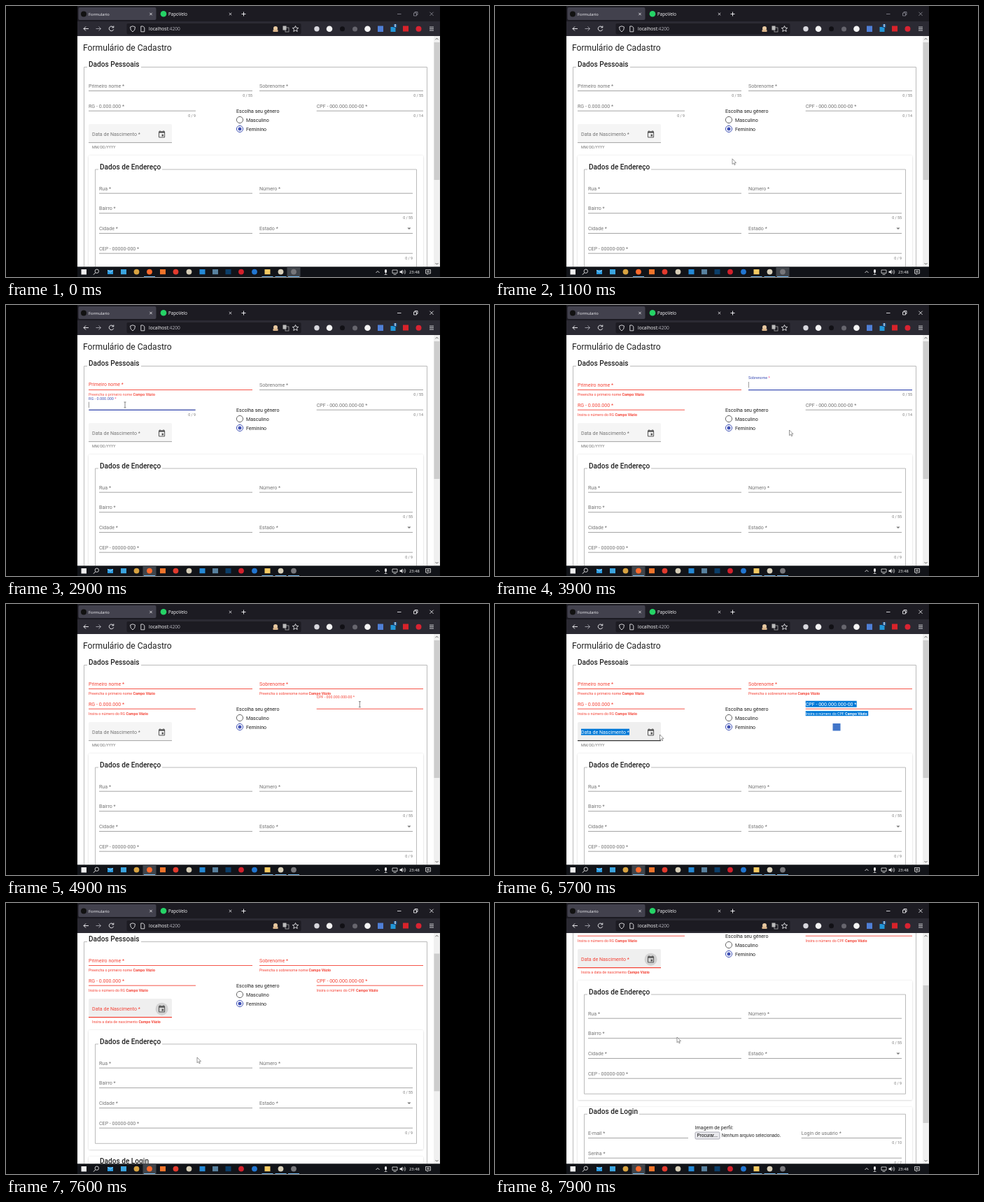
Recreate the animation shown at these times as an HTML page. Size 690 by 388 pixels, loop 8000 ms.

```html
<!DOCTYPE html>
<html lang="pt">
<head>
<meta charset="utf-8">
<title>Formulario</title>
<style>
html, body { margin: 0; height: 100%; overflow: hidden; background: #000; }
svg { display: block; width: 100%; height: 100%; font-family: Roboto, sans-serif; }
</style>
</head>
<body>
<svg id="stage" viewBox="0 0 690 388"></svg>
<script>
const LOOP = 8000, STEP = 100;
const BLUE = '#3f51b5', RED = '#f44336', GREY = '#757575', INK = '#212121', SELECT = '#0078d7';
const BODY = 7.08, SMALL = 5.31;
const UI = 'font-family="Open Sans, sans-serif"';

// Drawing helpers; text is placed by the middle of its capitals
const text = (x, cy, s, size, fill, more = '') =>
  `<text x="${x}" y="${cy + size * .355}" font-size="${size}" fill="${fill}" ${more}>${s}</text>`;
const rect = (x, y, w, h, fill, more = '') =>
  `<rect x="${x}" y="${y}" width="${w}" height="${h}" fill="${fill}" ${more}/>`;
const disc = (x, y, r, fill, more = '') => `<circle cx="${x}" cy="${y}" r="${r}" fill="${fill}" ${more}/>`;
const line = (d, stroke, w = 1, more = '') =>
  `<path d="${d}" fill="none" stroke="${stroke}" stroke-width="${w}" ${more}/>`;
const shape = (d, fill, more = '') => `<path d="${d}" fill="${fill}" ${more}/>`;

const clamp = u => Math.max(0, Math.min(1, u));
const easeOut = (u, power) => 1 - (1 - clamp(u)) ** power;

// Linear interpolation over rows of [time, ...values]
function along(keys, t) {
  let i = 0;
  while (i < keys.length - 2 && t >= keys[i + 1][0]) i++;
  const [a, b] = [keys[i], keys[i + 1]];
  const u = clamp((t - a[0]) / (b[0] - a[0]));
  return a.slice(1).map((v, k) => v + (b[k + 1] - v) * u);
}

const POINTER = [
  [400, 411, 366], [600, 397, 252], [900, 397, 252], [1700, 165, 119], [2200, 165, 119],
  [2650, 170, 143], [3000, 170, 143], [3450, 400, 115], [3700, 400, 115], [3900, 420.5, 179],
  [4250, 480, 143], [4700, 480, 143], [5000, 518, 144], [5200, 480, 168], [5400, 480, 168],
  [5700, 235.5, 187], [6100, 222, 183], [6500, 222, 183], [6800, 290, 201],
  [7300, 273, 221], [7600, 273, 221], [7900, 260, 192]
];
const SCROLL = [[7400, 0], [7600, 32], [7900, 103]];

const star = (label, fill) => `${label}<tspan fill="${fill}"> *</tspan>`;
const problem = (x, cy, s, opacity, fill = RED) =>
  text(x, cy, `${s} <tspan font-weight="700">Campo Vázio</tspan>`, SMALL, fill, `opacity="${opacity}"`);

function field(t, x1, x2, y, label, { max, error, on = Infinity, off = Infinity, selected } = {}) {
  const focused = t >= on && t < off, bad = t >= off;
  const lift = focused ? easeOut((t - on) / 400, 3.2) : bad ? 1 - easeOut((t - off) / 400, 3.2) : 0;
  const color = selected ? '#fff' : bad ? RED : focused ? BLUE : GREY;
  let out = line(`M${x1} ${y}H${x2}`, bad ? RED : '#9b9b9b', .9);
  if (selected) out += rect(x1, y - 11.5, 73, 9, SELECT) + rect(x1, y + 3, 89.5, 7, SELECT);
  out += text(x1, y - 7 - 10 * lift, star(label, focused ? '#ff4081' : color), BODY * (1 - .25 * lift), color);
  if (focused) {
    const half = (x2 - x1) / 2 * easeOut((t - on) / 300, 4.5), mid = (x1 + x2) / 2;
    out += line(`M${mid - half} ${y + .2}H${mid + half}`, BLUE, 1.3);
    if ((t - on) % 1000 < 500) out += line(`M${x1 + .4} ${y - 11.5}v8.5`, '#555', .6);
  }
  if (bad) {
    const u = easeOut((t - off) / 300, 2);
    out += problem(x1, y + 6.5 - 2.5 * (1 - u), error, u, color);
  } else if (max) out += text(x2, y + 6.5, `0 / ${max}`, SMALL, GREY, 'text-anchor="end"');
  return out;
}

function group(x1, x2, top, bottom, title, gapEnd, titleY) {
  const x = x1 + 6.5;
  return line(`M${x - 2} ${top}H${x1}V${bottom}H${x2}V${top}H${gapEnd}`, '#b4b4b4', .9) +
    text(x, titleY, title, 10.11, INK, 'font-weight="500"');
}

const card = (y, h) => rect(118, y, 478, h, '#fff', 'rx="2" filter="url(#shadow)"');

const radio = (y, label, on) =>
  disc(334, y, 4.6, '#fff', `stroke="${on ? BLUE : '#666'}"`) + (on ? disc(334, y, 2.5, BLUE) : '') +
  text(343, y, label, BODY, INK);

function birthDate(t) {
  const off = 6700, bad = t >= off, picked = t >= 5100 && t < 6200;
  const hover = t >= 5600 && t < off, opened = t >= 6300;
  const color = picked ? '#fff' : bad ? RED : GREY;
  let out = shape('M118 196V171q0-2 2-2H235q2 0 2 2V196Z', hover || bad ? '#efefef' : '#f5f5f5');
  out += line('M118 195.6H237', bad ? RED : hover ? '#333' : '#9b9b9b', bad || hover ? 1.2 : .9);
  if (picked) out += rect(123, 178.7, 69, 9, SELECT);
  out += text(123, 183.3, star('Data de Nascimento', color), BODY, color);
  if (opened) out += disc(222.6, 183.7, 9, '#d2d2d2');
  out += shape('M19 3h-1V1h-2v2H8V1H6v2H5q-2 0-2 2v14q0 2 2 2h14q2 0 2-2V5q0-2-2-2zm0 16H5V8h14zM12 12h5v5h-5z',
    '#555', 'transform="translate(216.5 177.8) scale(.5055)" fill-rule="evenodd"');
  if (bad) {
    const u = easeOut((t - off) / 300, 1.2);
    return out + problem(123, 202.5 - 2.5 * (1 - u), 'Insira a data de nascimento', u);
  }
  return out + text(123, 202.5, 'MM/DD/YYYY', SMALL, GREY);
}

function form(t) {
  return text(110, 60, 'Formulário de Cadastro', 12.13, INK) +
    group(111.5, 601.5, 87.5, 560, 'Dados Pessoais', 193, 83.7) +
    field(t, 118, 352, 121.5, 'Primeiro nome', { max: 55, error: 'Preencha o primeiro nome', on: 1900, off: 2700 }) +
    field(t, 362, 596, 121.5, 'Sobrenome', { max: 55, error: 'Preencha o sobrenome nome', on: 3500, off: 4300 }) +
    field(t, 118, 271, 150.2, 'RG - 0.000.000', { max: 9, error: 'Insira o número do RG', on: 2700, off: 3500 }) +
    field(t, 443.7, 596, 150.2, 'CPF - 000.000.000-00',
      { max: 14, error: 'Insira o número do CPF', on: 4300, off: 4900, selected: t >= 5100 && t < 6600 }) +
    text(329, 150, 'Escolha seu gênero', BODY, INK) +
    radio(163, 'Masculino') + radio(176, 'Feminino', true) +
    birthDate(t) +
    card(214, 171) +
    group(127.5, 586.5, 234, 376.3, 'Dados de Endereço', 223, 230.3) +
    field(t, 133, 352, 268.2, 'Rua') + field(t, 362, 581, 268.2, 'Número') +
    field(t, 133, 581, 296.7, 'Bairro', { max: 55 }) +
    field(t, 133, 352, 325.5, 'Cidade') + field(t, 362, 581, 325.5, 'Estado') +
    shape('M573.3 317.5h5.2l-2.6 2.6z', '#757575') +
    field(t, 133, 581, 354.2, 'CEP - 00000-000', { max: 9 }) +
    card(395, 140) +
    group(127.5, 586.5, 405.3, 520, 'Dados de Login', 206, 401.5) +
    field(t, 133, 276, 439.5, 'E-mail') +
    text(285.7, 424.7, 'Imagem de perfil:', BODY, INK) +
    rect(286, 431, 35, 10, '#e9e9ed', 'stroke="#8f8f9d" stroke-width=".7" rx="1.5"') +
    text(288.5, 436, 'Procurar...', 6.4, '#000', 'font-family="Liberation Sans, sans-serif"') +
    text(323.7, 436, 'Nenhum arquivo selecionado.', 6.4, INK, 'font-family="Liberation Sans, sans-serif"') +
    field(t, 437.7, 581, 439.5, 'Login de usuário', { max: 10 }) +
    field(t, 133, 581, 468.2, 'Senha', { max: 7 });
}

function browser(active) {
  const ink = '#fbfbfe', dim = active ? ink : '#8f8f98';
  const cross = (x, y, r, c) => line(`M${x - r} ${y - r}l${2 * r} ${2 * r}m0 ${-2 * r}l${-2 * r} ${2 * r}`, c, .8);
  return rect(102, 0, 518, 22, '#1c1b22') + rect(102, 22, 518, 21, '#2b2a33') +
    rect(103.5, 2, 111, 18, '#42414d', 'rx="2"') +
    disc(111, 11.5, 4, '#111') + text(118, 11.6, 'Formulario', 5.8, ink, UI) + cross(207, 11.5, 1.7, ink) +
    disc(225, 11.3, 4.3, '#25d366') + text(232, 11.6, 'PapoVelo', 6.2, ink, UI) + cross(320.5, 11.5, 1.7, ink) +
    line('M336.5 11.5h6m-3-3v6', ink, .9) +
    line('M559 11.5h5.5', dim, .8) + line('M582.5 10h4v4h-4zM584 10V8.500h4v4h-1.500', dim, .8) + cross(608, 11.3, 2.6, dim) +
    line('M118 32.500h-7m3-3l-3 3 3 3', ink, .9) + line('M128.500 32.500h7m-3-3l3 3-3 3', '#a5a5ad', .9) +
    line('M153.300 30.500a3.300 3.300 0 1 0 .4 3M153.800 28.500v2.400h-2.400', ink, .9) +
    rect(172.5, 25, 249, 15.5, '#1c1b22', 'rx="2"') +
    line('M181 28.800l3.500 1.200q.2 5-3.500 7-3.700-2-3.500-7z', ink, .8) +
    line('M192.800 29h3l2 2v5.800h-5z', ink, .8) +
    text(204, 32.8, 'localhost<tspan fill="#b5b5bd">:4200</tspan>', 6.65, ink, UI) +
    disc(385, 32, 3, '#e8c9a0') + rect(381.5, 34, 7, 3, '#d9b48a') +
    rect(395.500, 28.500, 5, 6, '#bbb') + rect(399, 31, 5, 6, 'none', 'stroke="#bbb" stroke-width=".7"') +
    line('M413.500 28.500l1.200 2.700 3 .3-2.200 2 .7 3-2.700-1.600-2.700 1.600.7-3-2.200-2 3-.3z', ink, .8) +
    disc(444, 32.7, 3.7, '#d8d8de') + disc(462, 32.7, 4.3, '#f4f4f4') + disc(480.5, 32.7, 3.5, '#111015') +
    disc(498.5, 33, 3.5, '#66656d') + disc(516.5, 32.7, 4.3, '#f4f4f4') + rect(531, 28.5, 8, 8.5, '#4f7fd6') +
    rect(549.500, 30, 7, 7, '#2196d8') + rect(553.500, 26, 5, 5, '#174d86') +
    text(556, 28.6, '0', 4.5, '#fff', 'text-anchor="middle" font-weight="700"') +
    rect(567, 28.5, 8, 8, '#d8232a') + disc(589.5, 32.7, 4, '#d92332') +
    line('M605 30.200h6m-6 2.400h6m-6 2.400h6', ink, .8);
}

// Taskbar marks as [x, colour, round]
const APPS = [
  [168, '#3ca5df'], [186.5, '#d9a441', 1], [205, '#ff6a2b', 1], [224, '#f0752b'], [242.5, '#e33b2e', 1],
  [261.5, '#d8cfb8', 1], [280.5, '#2489d6'], [299, '#58819f'], [317.500, '#0b3f6b'], [336, '#d3202b', 1],
  [355, '#2276d2', 1], [373.5, '#f4ca62'], [392.5, '#d8cfb8', 1], [411, '#77777b', 1]
];

function taskbar(active) {
  const c = '#e8e8e8';
  return rect(102, 373.3, 518, 14.7, '#111318') +
    rect(active ? 195.5 : 401.5, 373.3, 19, 14.7, '#40444a') +
    [205, 373.5, 392.5, 411].map(x => rect(x - 8, 387, 16, 1, '#76b9ed')).join('') +
    rect(107.5, 377, 7.5, 7.500, '#f0f0f0') +
    line('M127.500 382l-2.500 2.700', c, 1) + disc(129.800, 379.7, 2.7, 'none', `stroke="${c}" stroke-width=".9"`) +
    rect(145, 378, 8, 6, '#2b9be0') + line('M145 378l4 3.200 4-3.200', '#d7efff', .7) +
    APPS.map(([x, fill, round]) => round ? disc(x, 380.6, 3.9, fill) : rect(x - 4, 377, 8, 7.2, fill)).join('') +
    line('M528.500 382l2.500-2.500 2.500 2.500', c, .9) +
    rect(541, 377, 3, 5, c, 'rx="1.500"') + line('M542.500 382v2.500m-2 0h4', c, .7) +
    line('M552 378h7v4.500h-7zm1.500 6.500h4', c, .8) +
    shape('M562.500 379.500h2l2-2v6.500l-2-2h-2z', c) + line('M568 379q1.500 1.800 0 3.600m1.500-5q2.800 3.200 0 6.400', c, .7) +
    text(576, 380.7, '23:48', 5.8, '#fff', UI) +
    line('M599.500 377.500h7v5.500h-3l-1.500 1.500v-1.500h-2.500zm1.500 2h4m-4 1.700h4', c, .8);
}

function pointer(t) {
  if (t < 400) return '';
  const [x, y] = along(POINTER, t);
  const typing = (t >= 1700 && t < 3700 && (y < 124 || y > 138)) || (t >= 4200 && t < 5050);
  return typing
    ? line(`M${x - 1.500} ${y - 4}h3m-1.500 0v8m-1.500 0h3`, '#555', .7)
    : shape(`M${x} ${y}v7.800l1.800-1.600 1.300 2.700 1.200-.6-1.200-2.600h2.400z`, '#fff', 'stroke="#555" stroke-width=".6"');
}

function scene(t) {
  const [scroll] = along(SCROLL, t), active = t >= 2000;
  return `<defs><clipPath id="view"><path d="M102 43H611V373.300H102z"/></clipPath>
    <filter id="shadow"><feDropShadow dx="0" dy=".5" stdDeviation=".8" flood-opacity=".2"/></filter></defs>` +
    rect(102, 43, 518, 331, '#fff') +
    `<g clip-path="url(#view)"><g transform="translate(0 ${-scroll})">${form(t)}</g></g>` +
    (t >= 5300 && t < 6200 ? rect(482.5, 171, 11, 10.500, '#4276c9') : '') +
    rect(611, 43, 9, 330.3, '#f0f0f0') + rect(611.5, 52 + scroll * .64, 8, 197, '#cdcdcd') +
    line('M613.500 48.200l2-2 2 2M613.500 368l2 2 2-2', '#555', .9) +
    browser(active) + taskbar(active) + pointer(t);
}

const stage = document.getElementById('stage');
let shown = -1;
function tick(now) {
  const t = Math.floor(now % LOOP / STEP) * STEP;
  if (t !== shown) stage.innerHTML = scene(shown = t);
  requestAnimationFrame(tick);
}
tick(performance.now());
</script>
</body>
</html>
```
